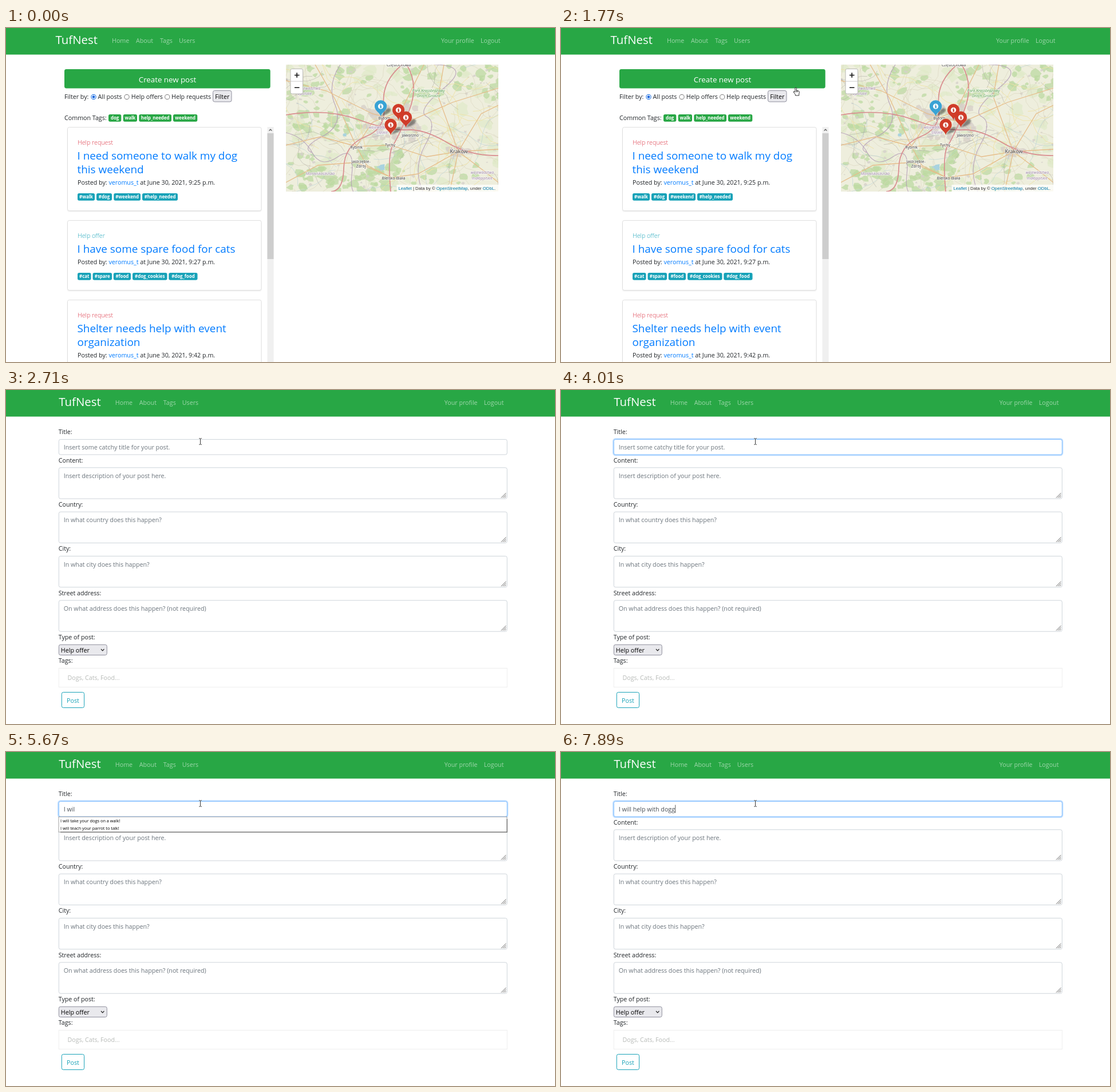
An HTML page that plays this animation: 959 px wide and 584 px high, repeating every 8000 ms.

```html
<!DOCTYPE html>
<html lang="en">
<head>
<meta charset="utf-8">
<title>Pet help board</title>
<style>
  html, body { margin: 0; width: 100%; height: 100%; overflow: hidden; background: #fff; }
  svg { display: block; }
  text { font: 10.7px "Open Sans", "Noto Sans", sans-serif; fill: #212529; white-space: pre; }
  .brand { font-size: 20.4px; fill: #fff; }
  .nav { fill: #fff; fill-opacity: .55; }
  .big { font-size: 13.3px; fill: #fff; }
  .title { font-size: 18.9px; fill: #007bff; }
  .light { font-weight: 300; }
  .badge { font-size: 7.9px; font-weight: 700; fill: #fff; }
  .hint { fill: #6c757d; }
  .item { font-size: 7.4px; fill: #000; }
  .place { font-size: 6.9px; fill: #333; stroke: #fff; stroke-opacity: .7; stroke-width: 1.6px; paint-order: stroke; }
  .region { font-style: italic; fill: #9a7fa5; }
  .park { font-style: italic; fill: #4f9a45; }
  .credit { font: 7.75px "Liberation Sans", Arial, sans-serif; fill: #333; }
  .mid { text-anchor: middle; }
</style>
</head>
<body>
<svg id="stage" width="959" height="584" viewBox="0 0 959 584"></svg>
<script>
const GREEN = '#28a745', TEAL = '#17a2b8', RED = '#dc3545', LINK = '#007bff';
const POSTER = 'veromus_t';

const text = (x, y, s, cls = '', fill = '') =>
  `<text x="${x}" y="${y}" class="${cls}"${fill && ` style="fill:${fill}"`}>${s}</text>`;
const rect = (x, y, w, h, fill, stroke = 'none', r = 0, more = '') =>
  `<rect x="${x}" y="${y}" width="${w}" height="${h}" rx="${r}" fill="${fill}" stroke="${stroke}" ${more}/>`;
const line = (d, stroke, width = 1, more = '') =>
  `<path d="${d}" fill="none" stroke="${stroke}" stroke-width="${width}" ${more}/>`;
const circle = (x, y, r, fill, stroke = 'none') =>
  `<circle cx="${x}" cy="${y}" r="${r}" fill="${fill}" stroke="${stroke}"/>`;
const repeat = (n, make) => Array.from({ length: n }, (_, i) => make(i)).join('');

let seed = 11;
const random = () => (seed = (seed * 16807) % 2147483647) / 2147483647;
const between = (a, b) => a + (b - a) * random();

const navbar = () => rect(0, 0, 959, 46.5, GREEN);
const navLinks = dx => `<g transform="translate(${dx})">` + text(86.5, 27.5, 'TufNest', 'brand') +
  [[185, 'Home'], [227, 'About'], [269, 'Tags'], [302, 'Users'], [760, 'Your profile'], [829, 'Logout']]
    .map(([x, s]) => text(x, 26, s, 'nav')).join('') + '</g>';

const badges = (y, fill, list) => list.map(([x, end, s]) =>
  rect(x, y, end - x, 12.8, fill, 'none', 2.8) + text((x + end) / 2, y + 9.3, s, 'badge mid')).join('');

function card(top, height, type, lines, time, tags = []) {
  const titleY = top + 56, postedY = titleY + 24 * (lines.length - 1) + 20.5;
  return rect(107.5, top + 1.5, 338.5, height, '#000', 'none', 3, 'opacity=".09" filter="url(#soft)"') +
    rect(107.5, top, 338.5, height, '#fff', '#dfdfdf', 3) +
    text(125, top + 30.5, type, 'light', type === 'Help offer' ? TEAL : RED) +
    lines.map((s, i) => text(124.5, titleY + 24 * i, s, 'title')).join('') +
    text(125, postedY, `Posted by: <tspan fill="${LINK}" style="fill:${LINK}">${POSTER}</tspan> at June 30, 2021, ${time} p.m.`) +
    badges(postedY + 15, TEAL, tags);
}

function radio(x, on) {
  return circle(x, 120.5, 4.1, '#fff', on ? '#0060df' : '#777') + (on ? circle(x, 120.5, 2.3, '#0060df') : '');
}

function marker(x, y, fill) {
  return `<g transform="translate(${x} ${y})">
    <path d="M0 0 L9 -12 Q16 -17 18 -12 Q18 -7 9 -3Z" fill="#000" opacity=".4" filter="url(#soft)"/>
    <path d="M0 0C-2 -8 -10.6 -9 -10.6 -18A10.6 10.2 0 0 1 10.6 -18C10.6 -9 2 -8 0 0Z" fill="${fill}"/>
    ${circle(0, -17.5, 4.7, '#fff')}<path d="M-1.3 -18.3H.6V-15.4M-1.5 -15.2H1.6M-.6 -20.3H.7" stroke="${fill}" stroke-width="1.3"/></g>`;
}

function map() {
  const blob = (x, y, size, fill, opacity) => {
    const points = Array.from({ length: 8 }, (_, i) => {
      const r = size * between(.5, 1.2), a = i * Math.PI / 4;
      return (x + r * 1.3 * Math.cos(a)).toFixed(1) + ',' + (y + r * Math.sin(a)).toFixed(1);
    });
    return `<polygon points="${points.join(' ')}" fill="${fill}" opacity="${opacity}"/>`;
  };
  const wander = (stroke, width) => {
    let x = between(480, 865), y = between(60, 290), a = between(0, 6.3), d = `M${x} ${y}`;
    for (let i = 0; i < 9; i++) {
      a += between(-.6, .6);
      x += 11 * Math.cos(a);
      y += 11 * Math.sin(a);
      d += `L${x.toFixed(1)} ${y.toFixed(1)}`;
    }
    return line(d, stroke, width);
  };
  const forests = [[575, 92, 60, 30], [520, 140, 35, 35], [590, 165, 35, 20], [650, 235, 45, 25],
    [735, 262, 90, 24], [735, 105, 45, 40], [825, 95, 40, 30], [610, 275, 45, 15], [520, 250, 35, 30]];
  const highways = ['M489 152Q560 140 615 160T700 178T770 200T860 223', 'M692 64Q655 95 660 135T628 190T590 245T568 286',
    'M700 64Q722 100 704 145T676 205T672 286'];
  const trunks = ['M489 92L560 110L640 150L700 165L780 130L860 105', 'M489 205L550 190L612 207L672 205L735 225L790 216L860 212',
    'M765 64L755 120L790 216L775 286', 'M612 207L640 165L690 145L730 64', 'M672 262L720 255L790 216L830 150L860 135',
    'M540 64L575 125L612 207L630 240L677 263', 'M489 270L545 240L612 235L677 263', 'M790 216L835 250L860 270'];
  const labels = [[686, 66.5, 'Częstochowa'], [661, 160, 'Bytom'], [612, 211, 'Rybnik'], [671, 207, 'Tychy'],
    [706, 190, 'Jaworzno'], [620, 235.5, 'Jastrzębie-'], [620, 244, 'Zdrój'], [677, 265, 'Bielsko-Biała']];
  const regions = [[529, 108, 'województwo'], [522, 117, 'opolskie'], [654, 176, 'województwo'], [657, 185, 'śląskie'],
    [832, 255, 'województwo'], [832, 264.5, 'małopolskie'], [549, 257, 'Moravskoslezsko']];
  const place = (list, cls) => list.map(([x, y, s]) => text(x, y, s, 'place mid ' + cls)).join('');

  return '<svg x="489" y="64" width="371" height="222" viewBox="489 64 371 222">' +
    rect(489, 64, 371, 222, '#eeeedd') +
    repeat(80, () => blob(between(489, 860), between(64, 286), between(4, 13), '#dfe9c7', .65)) +
    forests.map(([x, y, w, h]) => repeat(20, () =>
      blob(x + between(-w, w), y + between(-h, h), between(2, 9), '#bcd9a2', .75))).join('') +
    repeat(90, () => blob(between(489, 860), between(64, 286), between(1, 3), '#d5d0ca', .8)) +
    repeat(40, () => blob(670 + between(-45, 48), 162 + between(-25, 32), between(3, 8), '#d6cdc7', .75)) +
    repeat(12, () => blob(791 + between(-18, 18), 215 + between(-9, 9), between(3, 7), '#d6cdc7', .8)) +
    blob(655, 243, 6, '#a9d3df', 1) + blob(592, 187, 3, '#a9d3df', 1) +
    repeat(85, () => wander('#d9d4bd', .6)) + repeat(32, () => wander('#efe3a5', .9)) +
    repeat(16, () => wander('#aacbd3', .5)) + repeat(18, () => wander('#a8a7a0', .5)) +
    line('M489 183Q520 190 535 218T580 225T604 257T642 286M584 64Q560 100 575 135T552 190T535 218M728 286Q710 245 732 205T735 155T765 105T748 64', '#b29ab6', 1.2, 'opacity=".8"') +
    trunks.map(d => line(d, '#e6bd8b', 1.3)).join('') +
    highways.map(d => line(d, '#d98c8e', 1.7)).join('') +
    place(labels, '') + place(regions, 'region') +
    place([[738, 112, 'Park Krajobrazowy'], [738, 120.5, 'Orlich Gniazd']], 'park') +
    text(791, 219, 'Kraków', 'place mid" style="font-size:9px') +
    marker(654.5, 154.5, '#38a3d5') + marker(685.5, 161, '#d03c29') +
    marker(698.5, 174, '#d03c29') + marker(672, 187, '#d03c29') +
    rect(497, 71.5, 21.5, 43.5, '#fff', '#b9b9b5', 2.5) +
    line('M497 93.2H518.5', '#ccc') + line('M504 82.5H512.5M508.2 78.2V86.8M504 104.2H512.5', '#111', 1.6) +
    rect(682.5, 274, 178, 12, '#fff', 'none', 0, 'opacity=".75"') +
    `<text x="685.5" y="282.8" class="credit">` +
    ['Leaflet', ' | Data by © ', 'OpenStreetMap', ', under ', 'ODbL', '.'].map((s, i) =>
      `<tspan style="fill:${i % 2 ? '#333' : '#0078a8'}">${s}</tspan>`).join('') + '</text></svg>';
}

const home = () => navbar() + navLinks(0) +
  rect(101, 71, 361.5, 35.5, 'none', '#94d3a2', 4.5, 'id="ring" stroke-width="2.2"') +
  rect(102, 72, 359.7, 33.5, GREEN, 'none', 3.4, 'id="create"') + text(282, 94.7, 'Create new post', 'big mid') +
  text(102, 123.8, 'Filter by:') + radio(153, true) + text(160.5, 123.8, 'All posts') +
  radio(211, false) + text(218.8, 123.8, 'Help offers') + radio(281.7, false) + text(289, 123.8, 'Help requests') +
  rect(361.5, 109.5, 32.5, 19.5, '#e9e9ed', '#8f8f9d', 3) + text(377.8, 123.8, 'Filter', 'mid', '#000') +
  text(102, 160.8, 'Common Tags:') +
  badges(151, GREEN, [[179, 201.3, 'dog'], [204.7, 229, 'walk'], [232.3, 289, 'help_needed'], [292, 334.3, 'weekend']]) +
  card(173.5, 146, 'Help request', ['I need someone to walk my dog', 'this weekend'], '9:25',
    [[125, 155, '#walk'], [158, 185, '#dog'], [188.3, 235, '#weekend'], [238, 300, '#help_needed']]) +
  card(336.5, 122, 'Help offer', ['I have some spare food for cats'], '9:27',
    [[125, 148.5, '#cat'], [151.5, 185, '#spare'], [187.8, 218, '#food'], [221, 281.5, '#dog_cookies'], [284.3, 334.5, '#dog_food']]) +
  card(475.5, 146, 'Help request', ['Shelter needs help with event', 'organization'], '9:42') +
  rect(456.5, 173, 11, 411, '#f0f0f0') + rect(456.5, 184, 11, 220, '#cdcdcd') +
  line('M459.6 179.6L462 177.2L464.4 179.6', '#555', 1.3) + map();

const area = (y, label, hint) => text(91.7, y - 9, label) + rect(92.3, y + .3, 783, 54.3, '#fff', '#ced4da', 3) +
  text(100.7, y + 18.6, hint, 'hint') +
  line(`M865 ${y + 53}l8.5 -8.5M868 ${y + 53}l5.5 -5.5M871 ${y + 53}l2.5 -2.5`, '#555', .9);

const form = () => navbar() + navLinks(5.8) + text(91.7, 76.8, 'Title:') +
  rect(91.2, 85.3, 785, 28.8, 'none', '#007bff', 4, 'id="glow" stroke-width="2.3"') +
  rect(92.3, 86.4, 783, 26.6, '#fff', '#ced4da', 3, 'id="titleBox"') +
  text(100.7, 104, '', 'hint" id="typed') +
  rect(0, 92.5, .8, 14, '#333', 'none', 0, 'id="caret"') +
  area(135.5, 'Content:', 'Insert description of your post here.') +
  area(212.8, 'Country:', 'In what country does this happen?') +
  area(290.2, 'City:', 'In what city does this happen?') +
  area(367.6, 'Street address:', 'On what address does this happen? (not required)') +
  text(91.7, 435.8, 'Type of post:') + rect(92.3, 445.3, 84, 18.2, '#e9e9ed', '#8f8f9d', 3) +
  text(95.8, 458.6, 'Help offer', '', '#000') + line('M166 453L168.7 455.8L171.4 453', '#222', 1.2) +
  text(91.7, 477.3, 'Tags:') + rect(92.3, 486.5, 783, 33, '#fff', '#eee') +
  text(107.5, 506.5, 'Dogs, Cats, Food...', '', '#b8bbb8') +
  rect(97.3, 528.5, 39.3, 27, '#fff', TEAL, 3) + text(117, 547, 'Post', 'mid', TEAL) +
  '<g id="popup"></g>';

const CURSORS = {
  arrow: '<path d="M0 0V11.2L2.6 8.8L4.3 12.6L5.9 11.9L4.3 8.2H7.8Z" fill="#fff" stroke="#000" stroke-width=".8"/>',
  hand: '<path d="M0 0Q1.2 0 1.2 1.3V5L5 5.9Q6.3 6.4 6.2 8L5.6 11.5V13.8H-.8V12L-4 7.8Q-4 6 -2.2 7L-1.2 8V1.3Q-1.2 0 0 0ZM3 5.6V8M1.2 5V8" fill="#fff" stroke="#000" stroke-width=".8"/>',
  beam: '<path d="M-2.3 -5.3H-.6L0 -4.7L.6 -5.3H2.3M0 -4.7V4.7M-2.3 5.3H-.6L0 4.7L.6 5.3H2.3" fill="none" stroke="#fff" stroke-width="2" opacity=".6"/>' +
    '<path d="M-2.3 -5.3H-.6L0 -4.7L.6 -5.3H2.3M0 -4.7V4.7M-2.3 5.3H-.6L0 4.7L.6 5.3H2.3" fill="none" stroke="#222" stroke-width=".9"/>'
};

document.getElementById('stage').innerHTML =
  '<defs><filter id="soft" x="-20%" y="-20%" width="140%" height="140%"><feGaussianBlur stdDeviation="1.3"/></filter></defs>' +
  `<g id="home">${home()}</g><g id="form">${form()}</g><g id="cursor"></g>`;
const el = Object.fromEntries([...document.querySelectorAll('#stage [id]')].map(e => [e.id, e]));

const LOOP = 8000, PAGE = 2710, FOCUS = 3500;
const TITLE = 'I will help with dogg';
const KEYS = [5110, 5290, 5420, 5550, 5670, 5750, 5800, 6030, 6130, 6260, 6410,
  6590, 6700, 6820, 7200, 7270, 7330, 7510, 7640, 7760, 7890];
const SUGGESTIONS = ['I will take your dogs on a walk!', 'I will teach your parrot to talk!',
  'I need someone to walk my dog', 'I have some spare food for cats', 'I can look after your cat'];

const ramp = (t, from, to) => Math.min(1, Math.max(0, (t - from) / (to - from)));
const mix = (a, b, u) => a.map((v, i) => v + (b[i] - v) * u);
const rgb = c => `rgb(${c.map(Math.round)})`;
const show = (e, on) => e.setAttribute('display', on ? 'inline' : 'none');
const setHtml = (e, html) => { if (e.shown !== html) e.innerHTML = e.shown = html; };

function cursorAt(t) {
  const a = ramp(t, 800, 1590), b = ramp(t, 1590, 1770), c = ramp(t, 1770, 2150);
  if (t < 1590) return mix([885, 574], [485, 111], a * (1.3 - .3 * a));
  if (t < 1770) return mix([485, 111], [410.5, 104.3], b);
  return mix([410.5, 104.3], [339.5, 90], c * (2 - c));
}

function drawCursor(t) {
  const [x, y] = cursorAt(t);
  const onMap = x > 489 && x < 860 && y > 64 && y < 286;
  const kind = t >= 2640 ? 'beam' : t >= 1765 || onMap ? 'hand' : 'arrow';
  show(el.cursor, t >= 800);
  setHtml(el.cursor, CURSORS[kind]);
  el.cursor.setAttribute('transform', `translate(${x} ${y})`);
}

function drawHome(t) {
  const hover = mix([40, 167, 69], [33, 136, 56], ramp(t, 1770, 1920));
  const press = ramp(t, 2480, 2630);
  el.create.setAttribute('fill', rgb(mix(hover, [30, 126, 52], press)));
  el.ring.setAttribute('opacity', press);
}

function popup(count) {
  if (!count) return '';
  const bottom = 114 + 13 * count;
  return rect(92, 113.3, 783, bottom - 113.3, '#fff', '#8b8b8b', 0, 'stroke-width=".8"') +
    line(`M95 ${bottom + .2}H875.4V117`, '#777', 1.3) +
    SUGGESTIONS.slice(0, count).map((s, i) => text(95, 123 + 13 * i, s, 'item')).join('');
}

function drawForm(t) {
  const focus = ramp(t, FOCUS, FOCUS + 150);
  const count = KEYS.filter(k => k <= t).length;
  el.glow.setAttribute('opacity', .25 * focus);
  el.titleBox.setAttribute('stroke', rgb(mix([206, 212, 218], [128, 189, 255], focus)));
  setHtml(el.typed, count ? TITLE.slice(0, count) : 'Insert some catchy title for your post.');
  el.typed.style.fill = count ? '#495057' : '';
  const blinkOff = (t >= 4010 && t < 4550) || (t >= 5670 && t < 5750);
  show(el.caret, t >= FOCUS && !blinkOff);
  el.caret.setAttribute('x', 101 + (count ? el.typed.getComputedTextLength() : 0));
  setHtml(el.popup, popup(t < 5160 || count > 7 ? 0 : count < 3 ? 5 : 2));
}

function frame() {
  const t = performance.now() % LOOP, onForm = t >= PAGE;
  show(el.home, !onForm);
  show(el.form, onForm);
  (onForm ? drawForm : drawHome)(t);
  drawCursor(t);
  requestAnimationFrame(frame);
}
frame();
</script>
</body>
</html>
```
